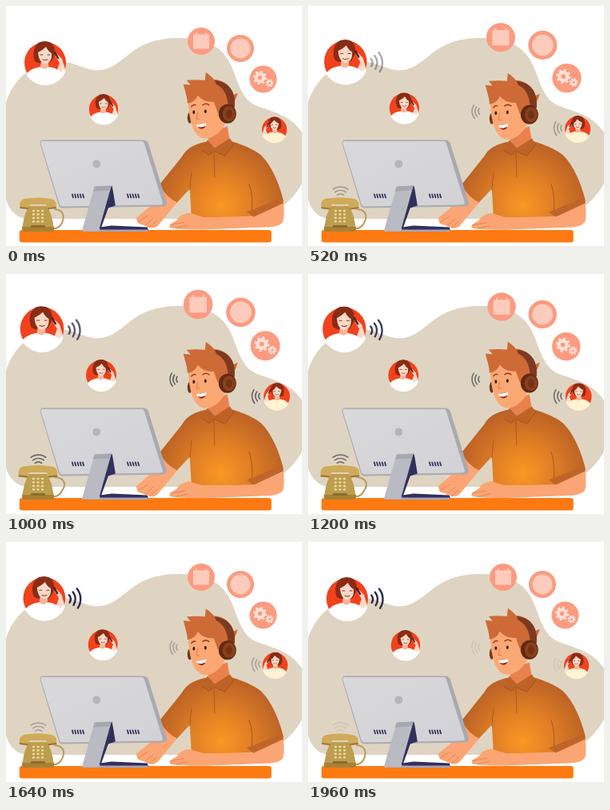
These frames come from a looping animation (370x300 px, 2000 ms). An HTML page:

```html
<!DOCTYPE html>
<html lang="en">
<head>
<meta charset="utf-8">
<title>Support agent</title>
<style>
html, body { margin: 0; width: 100%; height: 100%; overflow: hidden; background: #fff }
svg { display: block; width: 370px; height: 300px }
.line { fill: none; stroke-linecap: round; stroke-linejoin: round }
.wave { fill: none; stroke: #4b4a55; stroke-width: 1.600; stroke-linecap: round }
</style>
</head>
<body>
<svg viewBox="0 0 370 300">
  <defs>
    <radialGradient id="cloth" gradientUnits="userSpaceOnUse" cx="268" cy="248" r="82">
      <stop offset="0" stop-color="#fb9725"/><stop offset=".45" stop-color="#e07f25"/><stop offset="1" stop-color="#b96026"/>
    </radialGradient>
    <linearGradient id="metal" x2="1" y2="1">
      <stop stop-color="#d9d9dc"/><stop offset="1" stop-color="#d2d2d6"/>
    </linearGradient>
    <clipPath id="round"><circle cy=".5" r="27.500"/></clipPath>
    <g id="caller">
      <circle r="26" fill="#f2421d"/>
      <g clip-path="url(#round)">
        <path d="M-13-2C-18-16-11-28 0-27C10-27 14-18 11-8L7-1Q-6 3-13-2Z" fill="#8a2c15"/>
        <path d="M13 14L18 0L13-8L15-11L21-5L25 8L22 18Z" fill="#fdd9c7"/>
        <path d="M-28 29C-27 12-18 7-6 5Q-1 9 4 5C12 6 17 9 20 12L24 8Q27 14 28 29Z" fill="currentColor"/>
        <path d="M-5-3H4V5Q-1 10-6 5Z" fill="#f6b79c"/>
        <path d="M-9-13Q-3-16 1-20Q4-14 8-12Q9 0 0 1Q-8 0-9-13Z" fill="#fdd9c7"/>
        <path d="M-6-10h3M3-10h3M-3-4Q0-2 3-4" class="line" stroke="#8e3520" stroke-width="1"/>
        <path d="M12-13L16-6" class="line" stroke="#4c2522" stroke-width="2.500"/>
      </g>
    </g>
  </defs>

  <path fill="#dfd4c2" d="M0 121C6 101 20 82 44 73C82 60 96 85 122 79.500C151 73 157 40 216 40C260 40 275 58 283 78C291 99 296 118 314 125C336 133 356 137 370 158C388 185 378 228 341 254Q324 266 290 266H24Q6 262 0 242Z"/>

  <g id="icon1">
    <circle r="17" fill="#fb9b80"/>
    <rect x="-10" y="-8.500" width="20" height="18" rx="1" fill="#fdcbbb"/>
    <path d="M-6-10v3M6-10v3" class="line" stroke="#fdcbbb" stroke-width="2"/>
  </g>
  <g id="icon2">
    <circle r="17" fill="#fb9b80"/><circle r="12.500" fill="#fdcbbb"/>
  </g>
  <g id="icon3">
    <circle r="17" fill="#fb9b80"/>
    <g fill="none" stroke="#fde0d6">
      <circle cx="-4" cy="-2" r="4.700" stroke-width="4"/>
      <circle cx="-4" cy="-2" r="7.500" stroke-width="2.400" stroke-dasharray="2.950"/>
      <circle cx="8" cy="5" r="2.600" stroke-width="2.200"/>
      <circle cx="8" cy="5" r="4.300" stroke-width="1.600" stroke-dasharray="1.690"/>
    </g>
  </g>

  <use id="caller1" href="#caller" color="#fff"/>
  <use id="caller2" href="#caller" color="#fff"/>
  <use id="caller3" href="#caller" color="#fff3d2"/>
  <path id="wave1" class="wave" style="stroke:#29294a;stroke-width:2.400"/>
  <path id="wave2" class="wave"/>
  <path id="wave3" class="wave"/>
  <path id="wave4" class="wave"/>

  <g transform="translate(.8 .4)">
    <rect x="16" y="279.600" width="315" height="15.600" rx="3" fill="#fd7a12"/>

    <!-- agent -->
    <path d="M194 222L214 244L190 273Q185 279 177 276L164 270L162 265L178 251Z" fill="#fba574"/>
    <path d="M250 169C235 172 225 177 219 188L191 223Q199 238 213 245L229 228L231 264H308L346 243C341 222 332 200 318 186Q306 176 279 168Z" fill="url(#cloth)"/>
    <path d="M229 229L231 208M306 261Q309 238 303 222" class="line" stroke="#a75a1f" stroke-width="1"/>
    <path d="M252 158L276 150L279 168L259 180L252 171Z" fill="#e9814f"/>
    <path d="M251 167L244 180L253 186L259 181L273 187L284 172L279 165L260 177Z" fill="#bd6328"/>
    <path d="M244 180L253 186L259 181L273 187L284 172M259 183L260 213" class="line" stroke="#9c521f" stroke-width=".8"/>
    <g id="head">
      <ellipse cx="229" cy="139" rx="3" ry="7" fill="#713719"/>
      <path d="M227 117Q242 106 266 111L278 130Q274 156 255 164Q242 168 235 156Q228 144 227 117Z" fill="#fca875"/>
      <path d="M226 121C226 113 223 106 221 97L230 98L225 92Q238 91 248 92L249 82Q256 87 259 91C274 92 281 101 282 111L289 108Q285 120 279 128L264 133L259 119Q246 120 239 111Q235 120 226 121Z" fill="#cd6a36"/>
      <path d="M260 92C278 94 287 106 285 126L277 125C276 110 271 101 262 97Z" fill="#7d3a20"/>
      <ellipse cx="276" cy="134" rx="11" ry="12" fill="#5f2a16"/>
      <ellipse cx="278" cy="134" rx="8" ry="9.500" fill="#8c4019"/>
      <ellipse cx="278" cy="134" rx="4" ry="5.500" fill="#703319"/>
      <path d="M231 125Q233 122 236 123M245 123Q249 120 253 123" class="line" stroke="#8d421e" stroke-width="1.500"/>
      <ellipse cx="234" cy="132" rx="1.500" ry="2.300" fill="#39211b"/>
      <ellipse cx="248.500" cy="131" rx="1.500" ry="2.300" fill="#39211b"/>
      <path d="M239 132L237 140L241 141" class="line" stroke="#e8824f" stroke-width="1.200"/>
      <path d="M237 147Q244 148 250 144.500Q249 153 243 153Q239 152 237 147Z" fill="#9d2a1c"/>
      <path d="M237 147Q244 148 250 144.500L249 149Q243 152 238 150Z" fill="#fff"/>
    </g>

    <!-- monitor -->
    <path d="M117 276L131 274L176 276L177 280L116 281Z" fill="#30305b"/>
    <path d="M93 281.500H177L176 279H118Z" fill="#a5a5c2"/>
    <path d="M46 167H171Q175 167 177 171L200 245Q201 249 196 250L70 252Q66 252 65 248L42 172Q41 167 46 167Z" fill="#a9a9b1"/>
    <path d="M46 168.500H168Q171 168 172 171L195 245Q195 248 192 248L70 250Q67 250 66 247L43 172Q42 168 46 168.500Z" fill="url(#metal)"/>
    <circle cx="112.500" cy="197" r="5" fill="#b5b5bb"/>
    <path id="vents" class="line" stroke="#30305b" stroke-width="1.700"/>
    <path d="M129 224L132 225L136 249L127 252L118 277L114 279Z" fill="#30305b"/>
    <path d="M110 225L131 224L115 281H94Z" fill="#babac2"/>
    <path d="M110 225L131 224L129 230L108 231Z" fill="#a7a7b0"/>

    <g id="leftHand">
      <path d="M180 251L197 250L203 256L190 272Q185 279 178 276L173 274L164 271L162 264Q170 257 180 251Z" fill="#fba574"/>
      <path d="M165 269L176 262M173 274L183 265M179 276L188 268" class="line" stroke="#e98552" stroke-width="1"/>
    </g>
    <g id="rightHand">
      <path d="M308 262L346 246Q348 267 344 271Q338 276 324 276L246 279Q218 279 205 277Q202 275 205 272L213 267Q216 260 228 258L248 264Z" fill="#fba574"/>
      <path d="M205 273L222 270M212 277L226 274" class="line" stroke="#e98552" stroke-width="1"/>
    </g>
    <path d="M300 257L345 239L346 246L309 263Z" fill="#c0652a"/>
  </g>

  <!-- telephone -->
  <path id="cord" class="line" stroke="#b99a5a" stroke-width="2"/>
  <path d="M28 250H52L57 263L60 278Q60 281 57 281H23Q20 281 20 278L23 263Z" fill="#bd9d4e"/>
  <path d="M20 276H60V279Q60 282 57 282H23Q20 282 20 279Z" fill="#a88036"/>
  <rect x="31" y="274" width="18" height="3" rx="1" fill="#8c6a2c"/>
  <path id="keys" class="line" stroke="#f0dca7" stroke-width="2.300"/>
  <g id="handset">
    <path d="M18 253Q15 243 23 241Q40 238 56 241Q65 243 62 253L53 254Q52 249 49 248H31Q28 249 27 254Z" fill="#cfaa58"/>
    <path d="M18 252L27 253M53 253L62 252" class="line" stroke="#9e7832" stroke-width="2"/>
  </g>
</svg>
<script>
const $ = id => document.getElementById(id);
const set = (id, name, value) => $(id).setAttribute(name, value);
const mix = (a, b, k) => a + (b - a) * k;
const ease = k => (1 - Math.cos(Math.PI * Math.max(0, Math.min(1, k)))) / 2;

// Concentric arcs facing the given direction in degrees
function waves(id, x, y, direction, radii) {
  const point = (r, deg) => {
    const a = deg * Math.PI / 180;
    return `${x + r * Math.cos(a)} ${y + r * Math.sin(a)}`;
  };
  set(id, 'd', radii.map(r =>
    `M${point(r, direction - 36)}A${r} ${r} 0 0 1 ${point(r, direction + 36)}`).join(''));
}
waves('wave1', 72, 70.5, -3, [8, 14, 20.5]);
waves('wave2', 219, 131.5, 177, [6, 10, 14]);
waves('wave3', 322, 152.5, 177, [6, 10, 14.5]);
waves('wave4', 40.5, 242, -90, [7, 11.5, 16]);

let vents = '', keys = '';
for (let i = 0; i < 5; i++) {
  for (const x of [82, 151]) vents += `M${x + i * 3.3} 235l1.200 4`;
}
for (let i = 0; i < 12; i++) keys += `M${34 + i % 3 * 5.5} ${256 + (i / 3 | 0) * 4.5}h1`;
set('vents', 'd', vents);
set('keys', 'd', keys);

// Each mover: id, start x, y, scale, then end x, y, scale
const movers = [
  ['caller1', 49, 71, 1, 45, 68.5, 1.05],
  ['caller2', 122, 129, .7, 119, 126.5, .73],
  ['caller3', 335.5, 154.5, .6, 338.5, 153, .63],
  ['icon1', 244, 44, 1, 239.5, 37, 1.09],
  ['icon2', 293, 53, 1, 293.5, 47, 1.09],
  ['icon3', 321.5, 91.5, 1, 324.5, 89.5, 1.1]
];

function draw(now) {
  const t = Math.floor(now % 2000 / 40) * 40;
  const sway = ease(1 - Math.abs(t - 1000) / 1000);
  // Icons rise slowly, sink faster, then rest
  const lift = ease(t < 840 ? t / 840 : (1500 - t) / 660);
  for (const [id, x, y, size, x2, y2, size2] of movers) {
    const k = id.startsWith('icon') ? lift : sway;
    const s = mix(size, size2, k);
    const flip = id === 'caller3' ? -s : s;
    set(id, 'transform', `translate(${mix(x, x2, k)} ${mix(y, y2, k)}) scale(${flip} ${s})`);
  }
  const pulse = Math.min(t / 1000, 1, (2080 - t) / 1000);
  for (const id of ['wave2', 'wave3', 'wave4']) set(id, 'opacity', pulse * .85);
  set('wave1', 'opacity', Math.min(1, t / 1300));
  set('wave1', 'transform', `translate(${1 - sway} ${1 - sway})`);
  set('head', 'transform', `translate(0 ${.4 + sway * 2})`);
  set('leftHand', 'transform', `translate(0 ${sway})`);
  set('rightHand', 'transform', `translate(0 ${sway * .8})`);
  set('handset', 'transform', `translate(40 247) scale(${1 + sway * .07}) translate(-40 -247)`);
  const bend = mix(73, 75, sway);
  set('cord', 'd', `M61 254C${bend} 255 ${bend} 264 70 271Q66 279 58 278`);
  requestAnimationFrame(() => draw(performance.now() - start));
}
const start = performance.now();
draw(0);
</script>
</body>
</html>
```
